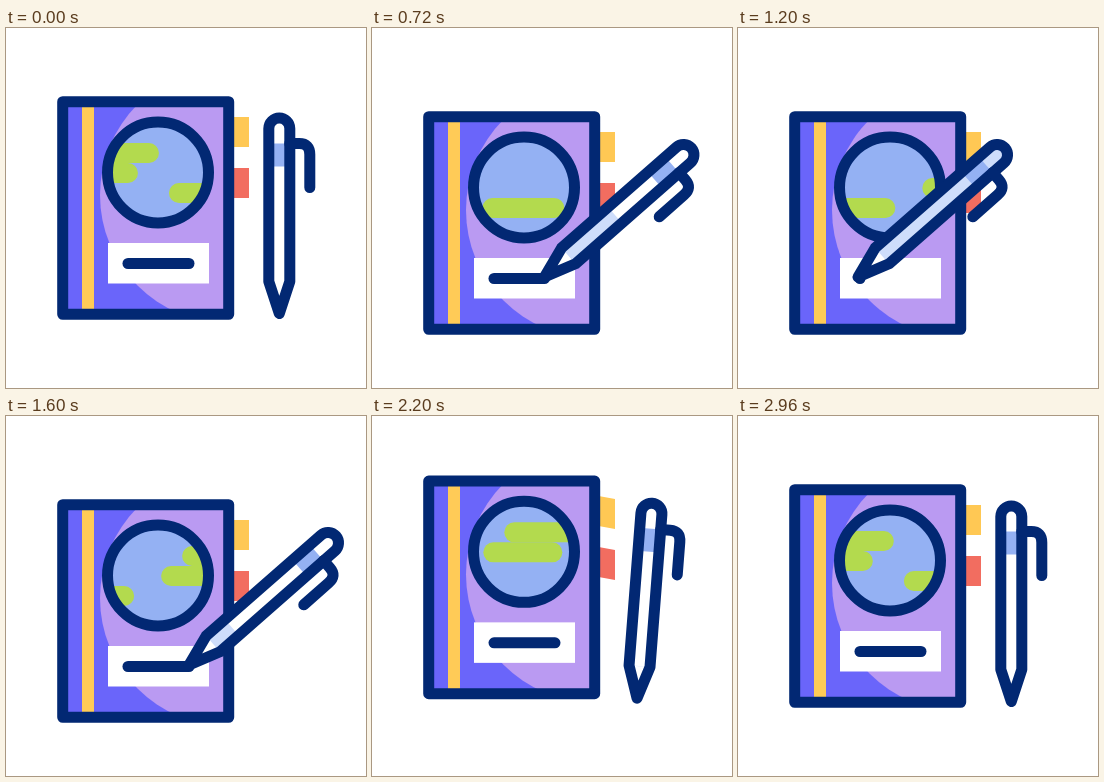
Write an HTML page that moves like this. It is 360 px wide and 360 px high and loops after 3000 ms.

```html
<!DOCTYPE html>
<html>
<head>
<meta charset="utf-8">
<style>
html, body { margin: 0; width: 100%; height: 100%; overflow: hidden; background: #fff; }
svg { display: block; width: 100vw; height: 100vh; }
.ink { stroke: #022873; stroke-width: 11; stroke-linecap: round; stroke-linejoin: round; fill: none; }
</style>
</head>
<body>
<svg viewBox="0 0 360 360">
  <defs>
    <clipPath id="cover"><rect x="57" y="74" width="166" height="212"/></clipPath>
    <clipPath id="globe"><circle cx="152" cy="144.5" r="50.5"/></clipPath>
    <clipPath id="barrel"><path d="M-10.5 -32V-185a10.5 10.5 0 0 1 21 0V-32L0 0Z"/></clipPath>
  </defs>
  <g id="book">
    <g id="tabs">
      <path d="M0 89h15v30H0z" fill="#ffc854"/>
      <path d="M0 140h15v30H0z" fill="#f26d60"/>
    </g>
    <g clip-path="url(#cover)">
      <rect x="51" y="68" width="178" height="224" fill="#6a65fa"/>
      <circle cx="222" cy="167" r="128" fill="#ba9af2"/>
      <rect x="76" y="68" width="12" height="224" fill="#ffcb57"/>
    </g>
    <rect x="102" y="215" width="101" height="40.5" fill="#fff"/>
    <rect class="ink" x="56.7" y="73.7" width="166" height="212.6"/>
    <circle cx="152" cy="144.5" r="50.5" fill="#94b1f3"/>
    <g clip-path="url(#globe)"><g id="land" fill="#b3da4e"></g></g>
    <circle class="ink" cx="152" cy="144.5" r="50.5"/>
    <path class="ink" id="line"/>
  </g>
  <g id="pen">
    <g clip-path="url(#barrel)">
      <rect x="-12" y="-200" width="24" height="200" fill="#fff"/>
      <rect id="shade" x="-12" width="24" fill="#ceddfb"/>
      <rect x="-12" y="-170" width="24" height="23" fill="#94b1f3"/>
    </g>
    <path class="ink" d="M-10.5 -32V-185a10.5 10.5 0 0 1 21 0V-32L0 0Z"/>
    <path class="ink" d="M10.5 -170H20Q30.5 -170 30.5 -159V-126"/>
  </g>
</svg>
<script>
const LOOP = 3000, SPIN = 219;
const el = id => document.getElementById(id);
const set = (id, attrs) => { for (const k in attrs) el(id).setAttribute(k, attrs[k]); };

// Eased value through [time, value] keys
function track(keys, t) {
  for (let i = 1; i < keys.length; i++) {
    const [t0, a] = keys[i - 1], [t1, b] = keys[i];
    if (t <= t1) return a + (b - a) * (1 - Math.cos(Math.PI * (t - t0) / (t1 - t0))) / 2;
  }
  return keys[keys.length - 1][1];
}

const lift = [[0, 0], [500, 15], [1600, 15], [2000, -17], [2500, 7], [2710, 0], [LOOP, 0]];
const tilt = [[0, 0], [540, 1], [1650, 1], [2335, 0], [LOOP, 0]];
const write = [[0, 183], [560, 183], [1160, 120], [1195, 120], [1600, 183], [LOOP, 183]];

// Continents repeat once per turn of the globe
const pills = [[163, 155, 82], [272, 135, 79], [293, 115, 79]];
el('land').innerHTML = [-SPIN, 0, SPIN].map(shift => pills.map(([x, y, w]) =>
  `<rect x="${x + shift}" y="${y}" width="${w}" height="20" rx="10"/>`).join('')).join('');

function draw(t) {
  const y = track(lift, t), k = track(tilt, t), x = track(write, t);
  const speed = (track(lift, Math.min(t + 2, LOOP)) - track(lift, Math.max(t - 2, 0))) / 4;
  const bend = Math.atan(speed * 35 / 15) * 180 / Math.PI;
  set('book', { transform: `translate(0 ${y})` });
  set('tabs', { transform: `translate(228 0) skewY(${bend})` });
  set('land', { transform: `translate(${-SPIN * t / LOOP} 0)` });
  set('line', { d: `M122 235.5H${Math.max(122, x)}` });
  set('pen', { transform: `translate(${273.3 + (x - 273.3) * k} ${285.5 - 36.5 * k}) rotate(${48.7 * k})` });
  const h = k * k * Math.min(165, 25 + 220 * (183 - x) / 63);
  set('shade', { y: -32 - h, height: h });
}

const start = performance.now();
function frame() {
  draw((performance.now() - start) % LOOP);
  requestAnimationFrame(frame);
}
frame();
</script>
</body>
</html>
```
